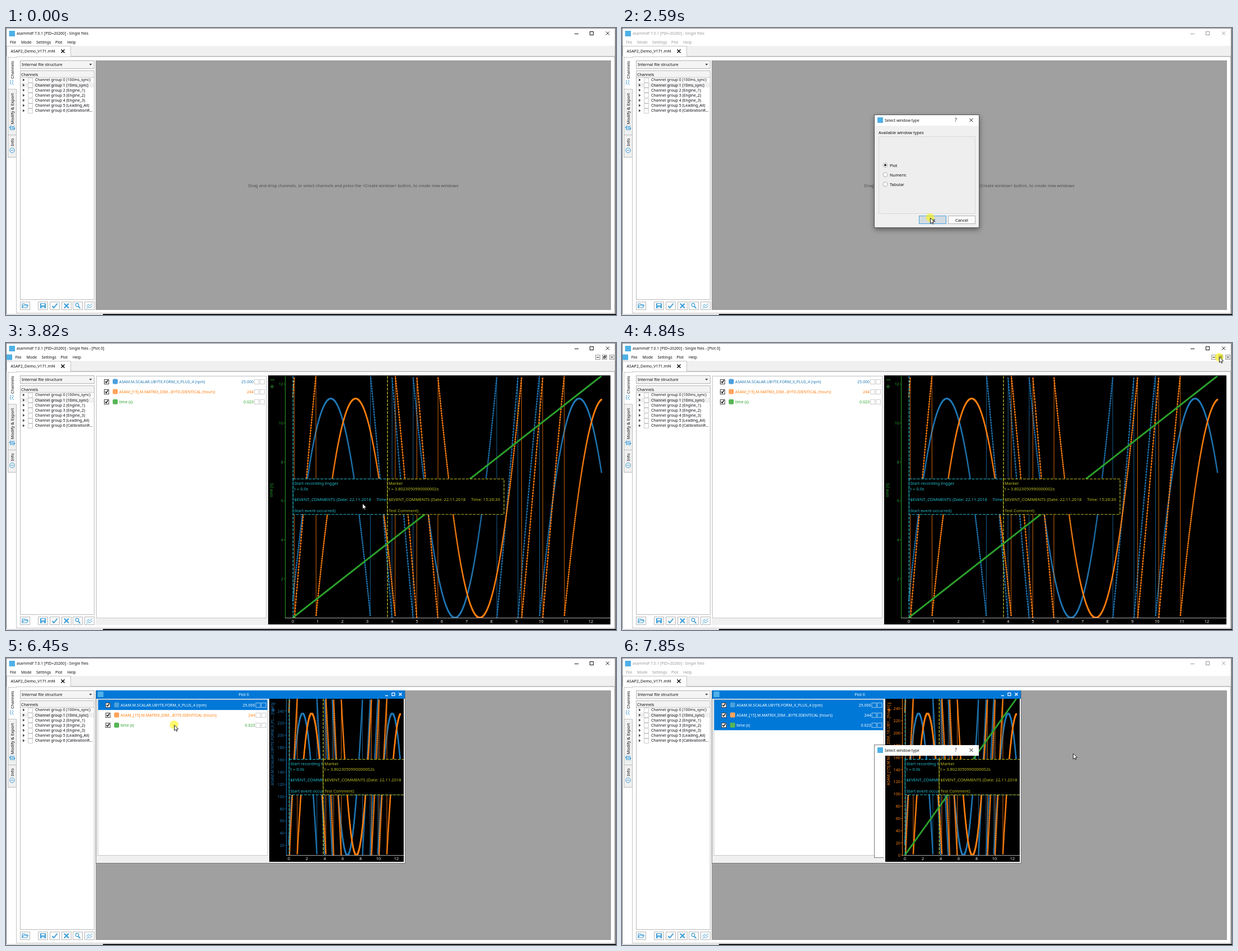
An HTML page with a canvas for the animation above (8000 ms loop, 1089 px wide and 514 px high).

```html
<!DOCTYPE html>
<html lang="en">
<head>
<meta charset="utf-8">
<title>Signal viewer: drag and drop</title>
<style>
html, body { margin: 0; width: 100%; height: 100%; overflow: hidden; background: #fff; }
canvas { display: block; }
</style>
</head>
<body>
<canvas id="stage" width="1089" height="514"></canvas>
<script>
const g = document.getElementById('stage').getContext('2d');
const LOOP = 8000;
const BLUE = '#1f77b4', ORANGE = '#ff7f0e', GREEN = '#2ca02c';
const SELECT = '#0078d7', ICON = '#3f9fd8', LOGO = '#4fb0e6', INK = '#0c0c14';
const CYAN = '#22becf', YELLOW = '#bcbd22';
const NAMES = ['ASAM.M.SCALAR.UBYTE.FORM_X_PLUS_4 (rpm)',
  'ASAM_[15].M.MATRIX_DIM...BYTE.IDENTICAL (hours)', 'time (s)'];
const VALUES = ['25.000', '244', '0.023'];
const COLORS = [BLUE, ORANGE, GREEN];
const SWATCHES = ['#4a9fdc', '#ffa35c', '#56b556'];
const GROUPS = ['100ms_sync)', '10ms_sync)', 'Engine_1)', 'Engine_2)', 'Engine_3)',
  'Leading_All)', 'CalibrationR...'];

// Drawing helpers
function box(x, y, w, h, fill, border) {
  if (border) {
    g.fillStyle = border;
    g.fillRect(x, y, w, h);
    x++; y++; w -= 2; h -= 2;
  }
  g.fillStyle = fill;
  g.fillRect(x, y, w, h);
}
function text(s, x, y, color = INK, size = 7, align = 'left') {
  g.font = `${size}px "Noto Sans", "Open Sans", sans-serif`;
  g.textAlign = align;
  g.fillStyle = color;
  g.fillText(s, x, y + size * 0.36);
}
function upText(s, x, bottom, color, size) {
  g.save();
  g.translate(x, bottom);
  g.rotate(-Math.PI / 2);
  text(s, 0, 0, color, size);
  g.restore();
}
function line(color, width, ...pts) {
  g.beginPath();
  for (let i = 0; i < pts.length; i += 2) g.lineTo(pts[i], pts[i + 1]);
  g.strokeStyle = color;
  g.lineWidth = width;
  g.stroke();
}
function poly(fill, ...pts) {
  g.beginPath();
  for (let i = 0; i < pts.length; i += 2) g.lineTo(pts[i], pts[i + 1]);
  g.closePath();
  g.fillStyle = fill;
  g.fill();
}
function ring(x, y, r, color, width, fill) {
  g.beginPath();
  g.arc(x, y, r, 0, 7);
  if (fill) { g.fillStyle = fill; g.fill(); }
  if (width) { g.strokeStyle = color; g.lineWidth = width; g.stroke(); }
}
function cross(x, y, r, color, width = 1) {
  line(color, width, x - r, y - r, x + r, y + r);
  line(color, width, x - r, y + r, x + r, y - r);
}
function plus(x, y, r, color) {
  line(color, 1, x - r, y, x + r, y);
  line(color, 1, x, y - r, x, y + r);
}
function outline(x, y, w, h, color, width = 1) {
  g.strokeStyle = color;
  g.lineWidth = width;
  g.strokeRect(x, y, w, h);
}

// Main window frame
function titleBar(s) {
  const c = s.modal ? '#999' : '#111';
  box(0, 0, 1089, 514, '#fff');
  box(0, 0, 1089, 1, '#8a8a8a');
  box(5.5, 5, 10.5, 10, LOGO);
  text('asammdf 7.0.1 [PID=20260] - Single files' + (s.max ? ' - [Plot 0]' : ''), 19, 10, c, 6.8);
  line(c, 1, 1015, 10.5, 1022, 10.5);
  outline(1042.5, 6.5, 6, 6, c);
  cross(1074, 9.5, 3, c);

  const shift = s.max ? 9.5 : 0;
  if (s.max) box(1, 20.5, 10, 10, LOGO);
  ['File', 'Mode', 'Settings', 'Plot', 'Help'].forEach((m, i) =>
    text(m, [7, 27, 54, 88, 109.5][i] + shift, 25.5, s.modal ? '#999' : INK, 6.9));
  if (s.max) {
    for (const x of [1052, 1064, 1077])
      box(x, 21, 9, 9, x == 1064 && s.k == 24 ? '#cfe6f7' : '#f8f8f8', '#999');
    line('#222', 1, 1054, 25.5, 1059, 25.5);
    outline(1066.5, 24.5, 3, 3, '#222', 0.8);
    outline(1068, 23, 3, 3, '#222', 0.8);
    cross(1081.5, 25.5, 2, '#222');
  }
}
function sideTabs() {
  box(0, 32, 1089, 19, '#f0f0f0');
  box(1, 50, 1086, 1, '#c4c4c4');
  box(1, 32, 115, 19, '#fff', '#c4c4c4');
  box(2, 49, 113, 3, '#fff');
  text('ASAP2_Demo_V171.mf4', 8.5, 41.5, INK, 7.1);
  cross(101.5, 41.5, 3, '#111', 1.6);

  box(18, 51, 1069, 460, '#fff', '#c4c4c4');
  box(3, 109, 16, 83, '#f0f0f0', '#bbb');
  box(3, 191, 16, 41, '#f0f0f0', '#bbb');
  box(3, 52, 16, 58, '#fff', '#c4c4c4');
  box(17, 53, 3, 56, '#fff');
  upText('Channels', 11.5, 91, INK, 7.4);
  upText('Modify & Export', 11.5, 172.5, INK, 7.4);
  upText('Info', 11.5, 211.5, INK, 7.4);
  for (const dx of [0, 4])
    line(ICON, 1, 7 + dx, 93, 9 + dx, 95.5, 7 + dx, 98, 9.5 + dx, 102);
  line(ICON, 1.4, 8, 183, 8, 176, 6, 179);
  line(ICON, 1.4, 11, 175, 11, 183);
  line(ICON, 1.4, 14, 175, 14, 182, 16, 179);
  ring(11, 219, 4.3, ICON, 1);
  line(ICON, 1, 8.5, 219, 13.5, 219);

  // Edges of the desktop behind the window
  box(0, 1, 1, 513, '#777');
  box(1087, 1, 2, 511, '#8a8a8a');
  box(0, 512, 173, 2, '#ddd');
  box(173, 512, 916, 2, '#111');
}
function channelTree(s) {
  box(25, 58, 133, 15, '#f4f4f4', '#b4b4b4');
  text('Internal file structure', 28, 65.5, INK, 7.3);
  poly('#444', 148.5, 64, 153.5, 64, 151, 67);
  box(25, 76, 133, 411, '#fff', '#b9b9b9');
  box(26, 77, 131, 11, '#f3f3f3');
  box(26, 88, 131, 1, '#c8c8c8');
  text('Channels', 27, 83, INK, 7);
  GROUPS.forEach((name, i) => {
    const y = 93 + i * 9.15;
    if (i == 1) box(26, y - 4.5, 131, 9, s.treeActive ? SELECT : '#f0f0f0');
    poly('#444', 30, y - 2.5, 33.5, y, 30, y + 2.5);
    box(39, Math.round(y) - 4, 9, 9, '#fff', '#ccc');
    text(`Channel group ${i} (${name}`, 52, y, i == 1 && s.treeActive ? '#fff' : INK, 6.9);
  });
}
function toolbar() {
  for (const x of [25, 57, 78, 99, 119, 140]) box(x, 490, 18, 15, '#fafafa', '#b8b8b8');
  line(ICON, 1.2, 29, 501, 29, 494, 33, 494, 34, 495.5, 38, 495.5, 38, 497, 31, 497, 29, 501, 37, 501, 39.5, 497, 38, 497);
  box(61, 493, 10, 9, ICON);
  box(63, 494, 6, 3, '#fff');
  box(63.5, 499, 5, 3, '#cde7f7');
  line(ICON, 2, 82.5, 498, 85.5, 501, 91.5, 493.5);
  cross(108, 497.5, 4, ICON, 2.3);
  ring(127, 496, 2.8, ICON, 1.2);
  line(ICON, 1.8, 129, 498.5, 132.5, 502);
  for (const dy of [0, 4])
    line(ICON, 1, 144, 498.5 + dy, 147, 495 + dy, 149.5, 497.5 + dy, 154, 493.5 + dy);
}

// Plot contents: the two signals are sines that wrap around at 256
const signal = (t, lead) => (500 + 500 * Math.sin((t + lead - 0.03) * Math.PI / 5)) % 256;

const TIME_AXIS = { color: GREEN, label: 'time [s]', span: 12.42, from: 0, first: 2, last: 12, step: 2 };
const RPM_AXIS = { color: BLUE, label: 'ASAM.M.SCALAR.UBYTE.FORM_X_PL... [rpm]', span: 256, from: 4, first: 20, last: 240, step: 20 };
const MATRIX_AXIS = { color: ORANGE, label: 'ASAM_[15].M.MATRIX_DIM_16.UBY...[hours]', span: 256, from: 0, first: 0, last: 240, step: 20 };
const MAX_PLOT = { x: 468, y: 58, w: 611, h: 446, axisX: 498, x0: 512, sx: 44.33, top: 59, base: 492, tick: 1, note: 243, label: 276 };
const SUB_PLOT = { x: 470, y: 73, w: 240, h: 292, axisX: 500, x0: 505, sx: 16, top: 73, base: 353, tick: 2, note: 181, label: 228 };

function curve(p, lead, color) {
  const scale = (p.base - p.top) / 256;
  const pts = [];
  for (let t = 0; t <= 12.43; t += 0.01)
    pts.push(p.x0 + t * p.sx, p.base - signal(t, lead) * scale);
  line(color, 0.8, ...pts);
  g.fillStyle = color;
  for (let i = 0; i < pts.length; i += 2) g.fillRect(pts[i] - 1.25, pts[i + 1] - 1.25, 2.5, 2.5);
}
function note(p, t, color, lines) {
  const x = p.x0 + t * p.sx + 0.5;
  g.setLineDash([5, 2]);
  line(color, 1.3, x, p.top, x, p.base);
  box(x, p.note, 208, 64, '#000');
  outline(x, p.note + 0.5, 208, 63.5, color, 1.2);
  g.setLineDash([]);
  lines.forEach((s, i) => text(s, x + 2, p.note + [8.5, 18, 37.5, 57][i], color, i == 2 ? 7.6 : 7.5));
}
function plot(p, axis, showTime) {
  g.save();
  g.beginPath();
  g.rect(p.x, p.y, p.w, p.h);
  g.clip();
  box(p.x, p.y, p.w, p.h, '#000');
  const right = p.x + p.w;

  upText(axis.label, p.x + 5.5, p.label, axis.color, 7.1);
  line(axis.color, 1, p.x + 4, p.y + 8, p.x + 11, p.y + 8);
  plus(p.x + 7, p.y + 20, 3.5, axis.color);
  line(axis.color, 1, p.axisX + 0.5, p.top, p.axisX + 0.5, p.base);
  for (let v = axis.first; v <= axis.last; v += axis.step) {
    const y = p.base - (v - axis.from) * (p.base - p.top) / axis.span;
    text(v, p.axisX - 3, y, axis.color, 7.3, 'right');
    line(axis.color, 0.8, p.axisX - 2, y, p.axisX, y);
  }
  line('#aaa', 1, p.axisX, p.base + 0.5, right, p.base + 0.5);
  for (let v = 0; v <= 12; v += p.tick) text(v, p.x0 + v * p.sx, p.base + 6.5, '#eee', 7.3, 'center');

  g.beginPath();
  g.rect(p.axisX, p.top, right - p.axisX, p.base - p.top);
  g.clip();
  curve(p, 1, BLUE);
  curve(p, 0, ORANGE);
  if (showTime) line(GREEN, 3, p.x0, p.base, p.x0 + 12.43 * p.sx, p.top);
  const stamp = '$EVENT_COMMENTS (Date: 22.11.2018     Time: 15:26:39';
  note(p, 0, CYAN, ['Start recording trigger', 't = 0.0s', stamp, 'Start event occurred)']);
  note(p, 3.802, YELLOW, ['Marker', 't = 3.8023050990000002s', stamp, 'Test Comment)']);
  g.restore();
}

function signalList(x, y, h, selected) {
  box(x, y, 304, h, '#fff', '#c8c8c8');
  NAMES.forEach((name, i) => {
    const cy = y + 10 + i * 18.1, on = i < selected, c = on ? '#fff' : COLORS[i];
    if (on) box(x + 1, cy - 9.3, 302, 18.4, SELECT);
    const top = Math.round(cy) - 4;
    box(x + 14, top, 9, 9, '#fff', '#444');
    line('#000', 1.4, x + 16, cy, x + 18, cy + 2.2, x + 21, cy - 2.5);
    g.beginPath();
    g.roundRect(x + 29.5, cy - 4.5, 9, 9, 2);
    g.fillStyle = SWATCHES[i];
    g.fill();
    line(COLORS[i], 0.01, 0, 0);
    g.beginPath();
    g.roundRect(x + 29.5, cy - 4.5, 9, 9, 2);
    g.stroke();
    text(name, x + 41, cy, c, 7);
    text(VALUES[i], x + 281, cy, c, 7, 'right');
    for (const dx of [282, 292]) box(x + dx, top, 9, 9, on ? SELECT : '#fff', on ? '#9cc8ea' : '#ccc');
  });
}
function maximized() {
  box(160, 58, 920, 447, '#f0f0f0');
  signalList(161, 59, 434, 0);
  plot(MAX_PLOT, TIME_AXIS, true);
}
function subWindow(s) {
  box(160, 58, 553, 310, '#f0f0f0', '#777');
  box(161, 58, 551, 15, SELECT);
  box(163.5, 60, 10.5, 10, LOGO);
  text('Plot 0', 424.5, 65.5, '#fff', 7, 'center');
  line('#fff', 1.4, 677, 67.5, 682, 67.5);
  outline(689, 62.5, 5, 5, '#fff', 1.2);
  cross(704, 65, 2.5, '#fff', 1.4);
  signalList(163.5, 74, 280, s.selected);
  const axis = [TIME_AXIS, RPM_AXIS, , MATRIX_AXIS][s.selected];
  plot(SUB_PLOT, axis, s.selected != 1);
}
function dialog(s) {
  const partial = s.k == 39;
  if (!partial) {
    g.save();
    g.shadowColor = 'rgba(0,0,0,.45)';
    g.shadowBlur = 9;
    g.shadowOffsetY = 3;
    box(451, 156, 187, 202, '#f0f0f0');
    g.restore();
    box(450, 155, 188, 203, '#f0f0f0', '#555');
  } else {
    box(450, 155, 20, 203, '#fff', '#777');
    box(467, 175, 3, 183, '#f0f0f0');
  }
  box(451, 156, 186, 19, '#fff');
  box(456, 160, 10, 10, LOGO);
  text('Select window type', 469, 165.5, '#111', 6.9);
  text('?', 596, 165.5, '#111', 8, 'center');
  cross(623.5, 165, 3, '#111');
  if (partial) return;

  text('Available window types', 458, 187.5, INK, 7.4);
  box(458, 194, 173, 139, '#eeeeee', '#d8d8d8');
  ['Plot', 'Numeric', 'Tabular'].forEach((name, i) => {
    const y = 245.5 + 17.2 * i;
    ring(470, y, 4, '#999', 0.8, '#fff');
    if (!i) ring(470, y, 2, '', 0, '#222');
    text(name, 478, y + 0.5, INK, 7.4);
  });
  box(530, 336, 49, 15, s.k > 11 ? '#d2dbe2' : '#f4f4f4', '#4ba3dc');
  box(582, 336, 49, 15, '#fafafa', '#b4b4b4');
  text('OK', 554.5, 344, INK, 7.4, 'center');
  text('Cancel', 606.5, 344, INK, 7.4, 'center');
}

// Pointer path as step, x, y
const PATH = [[1, 250, 300], [3, 110, 102], [5, 118, 105], [8, 496, 203], [9, 498, 205],
  [13, 550, 340], [18, 550, 340], [24, 1066, 25], [25, 1066, 25], [30, 300, 84], [31, 300, 84],
  [32, 300, 120], [35, 300, 120], [38, 805, 171], [40, 805, 171]];
const within = (k, ...spans) => spans.some(([a, b = a]) => k >= a && k <= b);

function pointer(k) {
  if (k < 1) return;
  const i = PATH.findIndex(p => p[0] > k);
  const [a, b] = [PATH[i - 1], PATH[i]];
  const f = (k - a[0]) / (b[0] - a[0]);
  const x = a[1] + (b[1] - a[1]) * f, y = a[2] + (b[2] - a[2]) * f;
  if (within(k, [4, 8], [13], [24], [30], [32], [36, 37]))
    ring(x, y - 0.5 + (k == 24), 7.5, '', 0, 'rgba(255,245,0,.58)');
  g.save();
  g.translate(x + 0.5, y);
  poly('#fff', 0, 0, 0, 10, 2.3, 8, 4, 11.3, 5.4, 10.7, 3.9, 7.4, 7, 7.2);
  g.strokeStyle = '#111';
  g.lineWidth = 0.9;
  g.stroke();
  if (within(k, [6, 8], [36, 37])) {
    box(6, 10, 7, 7, '#fff', '#222');
    plus(9.5, 13.5, 1.8, '#222');
  }
  g.restore();
}

function draw(now) {
  const k = Math.min(39, Math.floor((now % LOOP + 35) / 201.5));
  const s = {
    k,
    max: within(k, [14, 24]),
    modal: within(k, [10, 13], [39]),
    treeActive: within(k, [4, 9]),
    selected: k < 31 ? 0 : k < 33 ? 1 : 3
  };
  titleBar(s);
  sideTabs();
  channelTree(s);
  toolbar();
  box(160, 58, 920, 447, '#a0a0a0');
  if (s.max) maximized();
  else {
    if (k < 14) text('Drag and drop channels, or select channels and press the <Create window> button, to create new windows',
      620, 282, '#4c4c4c', 7.5, 'center');
    if (k > 24) subWindow(s);
  }
  if (s.modal) dialog(s);
  pointer(k);
}

const start = performance.now();
function tick() {
  draw(performance.now() - start);
  requestAnimationFrame(tick);
}
tick();
</script>
</body>
</html>
```
